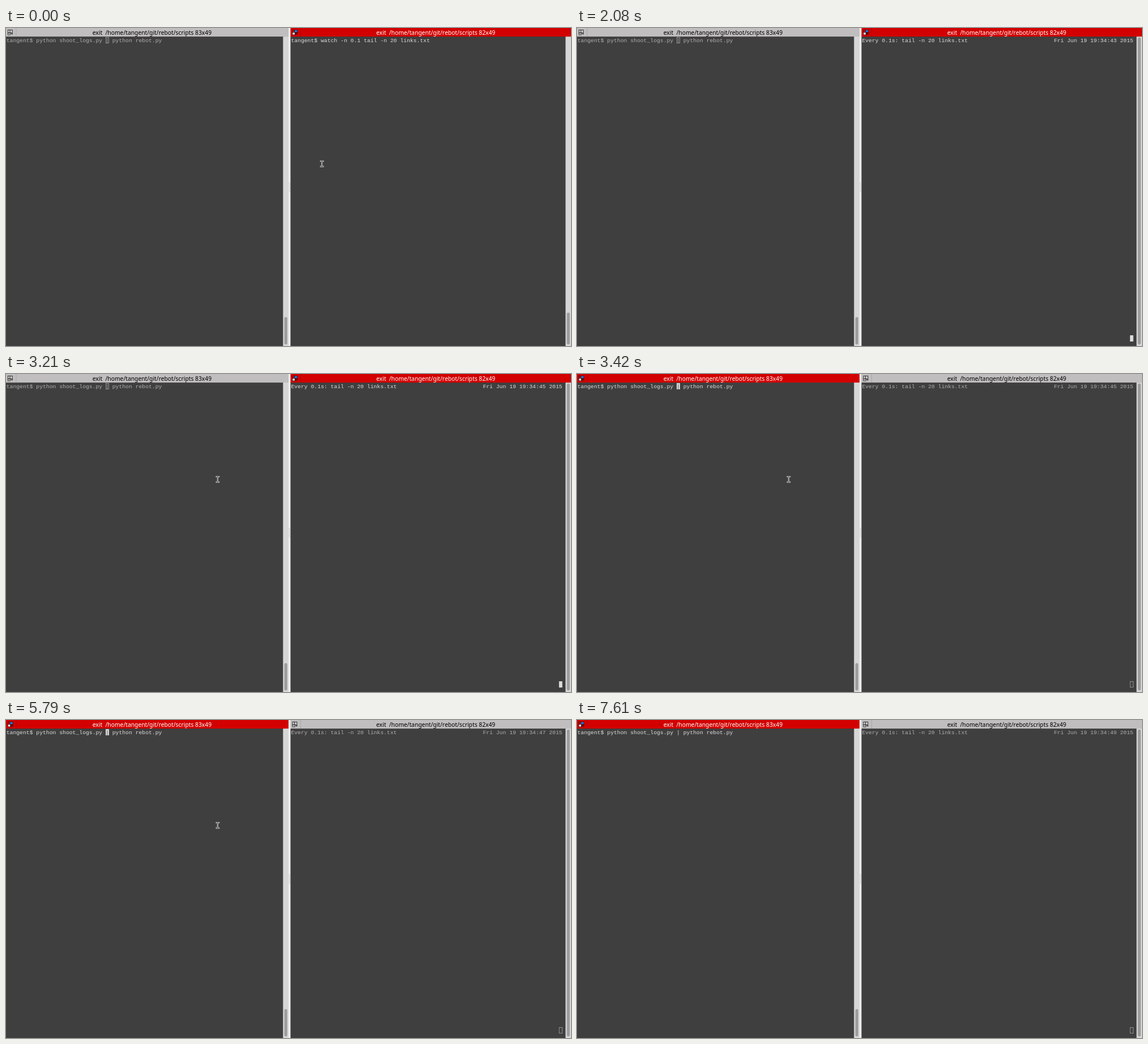
Write an HTML page with a canvas that moves like this. It is 998x561 px and loops after 8000 ms.

```html
<!DOCTYPE html>
<html lang="en">
<head>
<meta charset="utf-8">
<title>Split terminal</title>
<style>
html, body { margin: 0; width: 100%; height: 100%; overflow: hidden; background: #3f3f3f; }
canvas { display: block; }
</style>
</head>
<body>
<canvas id="stage" width="998" height="561"></canvas>
<script>
const ctx = document.getElementById('stage').getContext('2d');
const LOOP = 8000, SCALE = 998 / 1366; // drawn in a 1366 x 768 desktop
const CELL_W = 8, CELL_H = 15, TOP = 22;
const BG = '#3f3f3f', FG = '#dcdcdc', DIM = '#afafaf';
const PROMPT = 'tangent$ ';
const CLOCK_TICKS = [2210, 3140, 4130, 5260, 6080, 7090];

const left = { x: 0, width: 683, center: 353, size: '83x49' };
const right = { x: 688, width: 678, center: 1039, size: '82x49' };

const passed = (times, t) => times.filter(time => t >= time).length;
const isOdd = n => n % 2 === 1;

function rect(x, y, w, h, color) {
  ctx.fillStyle = color;
  ctx.fillRect(x, y, w, h);
}

function box(x, y, w, h, color) {
  ctx.strokeStyle = color;
  ctx.lineWidth = 1;
  ctx.strokeRect(x + .5, y + .5, w - 1, h - 1);
}

function groupIcon(x, active) {
  if (active) {
    rect(x + 4, 4, 13, 13, '#3a0808');
    rect(x + 5, 5, 4, 5, '#d20000');
    rect(x + 10, 5, 6, 5, '#1c7be0');
    rect(x + 5, 11, 5, 5, '#e4e4e4');
    rect(x + 12, 12, 5, 5, '#d20000');
  } else {
    box(x + 4, 4, 12, 8, '#111');
    box(x + 4, 11, 7, 6, '#111');
    rect(x + 9, 4, 1, 8, '#111');
  }
  ctx.fillStyle = '#111';
  ctx.beginPath();
  ctx.moveTo(x + 12, 13);
  ctx.lineTo(x + 17, 13);
  ctx.lineTo(x + 14.5, 16);
  ctx.fill();
}

function drawPane(pane, active, thumbTop) {
  const { x, width, center, size } = pane;
  const barX = x + width - 13;
  rect(x, 0, width, 21, active ? '#d20000' : '#c0bebf');
  rect(x + 24, 0, 1, 21, active ? '#a80000' : '#a09e9f');
  groupIcon(x, active);
  ctx.font = '14.1px "Noto Sans", sans-serif';
  ctx.textAlign = 'center';
  ctx.fillStyle = active ? '#fff' : '#000';
  ctx.fillText('exit  /home/tangent/git/rebot/scripts ' + size, center, 16);
  rect(x, 21, width - 13, 747, BG);
  rect(barX, 21, 13, 747, '#d6d6d6');
  ctx.fillStyle = '#9c9c9c';
  ctx.beginPath();
  ctx.roundRect(barX + 3, thumbTop, 7, 764 - thumbTop, 3.5);
  ctx.fill();
}

function print(pane, text, col, color) {
  ctx.font = '13.33px "Liberation Mono", monospace';
  ctx.textAlign = 'left';
  ctx.fillStyle = color;
  ctx.fillText(text, pane.x + 1 + col * CELL_W, 34);
}

function textCursor(pane, col, row, focused) {
  const x = pane.x + 1 + col * CELL_W, y = TOP + row * CELL_H;
  if (focused) rect(x, y, CELL_W, CELL_H, FG);
  else box(x, y, CELL_W, CELL_H, DIM);
}

function pointer(x, y) {
  ctx.beginPath();
  for (const dy of [-6.5, 6.5]) {
    ctx.moveTo(x - 3, y + dy);
    ctx.lineTo(x + 3, y + dy);
  }
  ctx.moveTo(x, y - 6.5);
  ctx.lineTo(x, y + 6.5);
  for (const [width, color] of [[3, '#e8e8e8'], [1, '#222']]) {
    ctx.lineWidth = width;
    ctx.lineCap = 'square';
    ctx.strokeStyle = color;
    ctx.stroke();
  }
  ctx.lineCap = 'butt';
}

function drawLeft(t, active) {
  const color = active ? FG : DIM;
  const entered = t >= 5870;
  drawPane(left, active, 698);
  print(left, PROMPT + 'python shoot_logs.py | python rebot.py', 0, color);
  if (entered) {
    if (!isOdd(passed([6420, 7020, 7610], t))) textCursor(left, 0, 1, true);
  } else if (!isOdd(passed([4010, 4610, 5210, 5790], t))) {
    textCursor(left, 30, 0, active);
    if (active) print(left, '|', 30, BG);
  }
}

function drawRight(t, active) {
  const color = active ? FG : DIM;
  const watching = t >= 2080;
  drawPane(right, active, watching ? 23 : 687);
  if (watching) {
    print(right, 'Every 0.1s: tail -n 20 links.txt', 0, color);
    print(right, `Fri Jun 19 19:34:${43 + passed(CLOCK_TICKS, t)} 2015`, 58, color);
    if (t < 2620 || t >= 3210) textCursor(right, 81, 48, active);
  } else {
    print(right, PROMPT + 'watch -n 0.1 tail -n 20 links.txt', 0, color);
    if (isOdd(passed([500, 1090, 1700], t))) textCursor(right, 43, 0, true);
  }
}

function drawPointer(t) {
  if ((t >= 2040 && t < 2780) || t >= 5830) return; // hidden while typing
  const step = Math.floor((t - 2780) / 50);
  const p = Math.min(1, Math.max(0, step / 7));
  const eased = p * p * (3 - 2 * p);
  pointer(763.8 - 252 * eased, 328 - 73.5 * eased);
}

function draw(t) {
  const leftActive = t >= 3420;
  ctx.setTransform(SCALE, 0, 0, SCALE, 0, 0);
  rect(683, 0, 5, 768, '#ededed');
  for (let i = 0; i < 6; i++) rect(684 + i % 2, 373 + i * 4, 2, 2, '#bcbcbc');
  drawLeft(t, leftActive);
  drawRight(t, !leftActive);
  drawPointer(t);
}

function frame() {
  draw(performance.now() % LOOP);
  requestAnimationFrame(frame);
}
frame();
</script>
</body>
</html>
```
